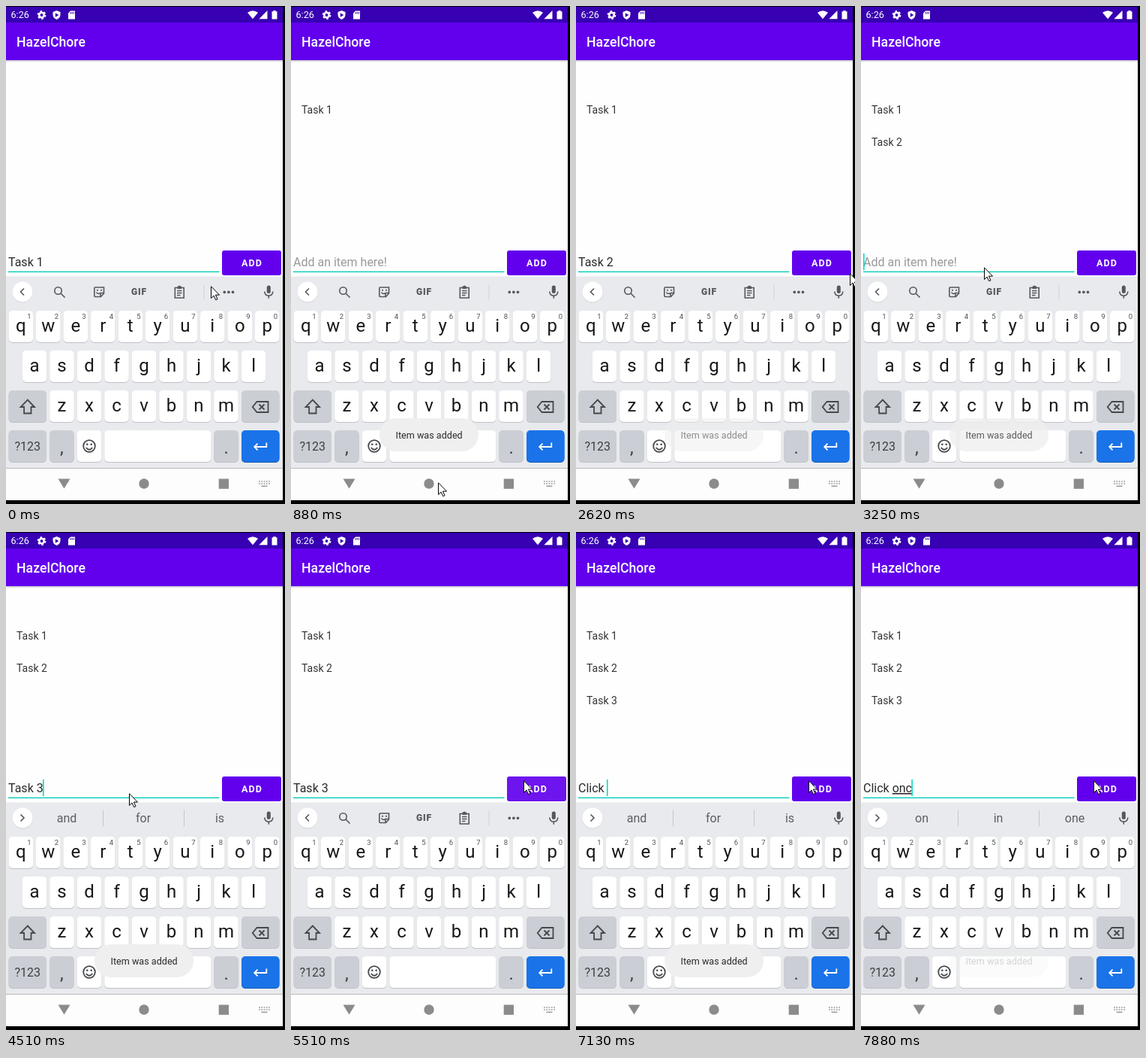
An HTML page that plays this animation: 372 by 662 pixels, repeating every 8 s.

```html
<!DOCTYPE html>
<html lang="en">
<head>
<meta charset="utf-8">
<title>Task list</title>
<style>
  html, body { margin: 0; width: 100%; height: 100%; overflow: hidden; background: #000; }
  svg { display: block; width: 372px; height: 662px; font-family: Roboto, sans-serif; }
  text { white-space: pre; }
  .mid { text-anchor: middle; }
  .line { fill: none; stroke: #54575b; stroke-width: 1.6; }
  .ink { fill: #54575b; }
</style>
</head>
<body>
<svg viewBox="0 0 372 662">
  <defs>
    <linearGradient id="shade" x2="0" y2="1"><stop stop-color="#c8c8cc"/><stop offset="1" stop-color="#fefefe"/></linearGradient>
  </defs>
  <rect width="372" height="662"/>
  <rect y="72" width="369" height="288" fill="#fefefe"/>
  <rect y="72" width="369" height="3" fill="url(#shade)"/>
  <rect y="1" width="369" height="21" fill="#3700b3"/>
  <rect y="22" width="369" height="50" fill="#6200ee"/>

  <!-- status bar -->
  <g fill="#fff">
    <text x="6.5" y="16.3" font-size="12.6">6:26</text>
    <circle cx="47.5" cy="12" r="3.2" fill="none" stroke="#fff" stroke-width="2.6"/>
    <circle cx="47.5" cy="12" r="5" fill="none" stroke="#fff" stroke-width="1.8" stroke-dasharray="2.6 2.636"/>
    <path d="M67.5 6L72.5 8V11.5Q72.2 16 67.5 18Q62.8 16 62.5 11.5V8Z"/>
    <path d="M65.8 9.2L70.3 12L65.8 14.8Z" fill="#3700b3"/>
    <path d="M86 6.5H92V17.5H83V9.5Z"/>
    <path d="M86.3 8V10.5M88.3 8V10.5M90.3 8V10.5" stroke="#3700b3"/>
    <path d="M322 8.8Q329 3.6 336 8.8L329 17.3Z"/>
    <path d="M348.5 6V17.3H337.3Z"/>
    <path d="M356.4 6H359.6V7.2H361.5V17.5H354.5V7.2H356.4Z"/>
  </g>
  <text x="14" y="54" font-size="17.7" font-weight="500" fill="#fff">HazelChore</text>

  <g id="list" font-size="14" fill="#333"></g>

  <!-- entry row -->
  <rect x="3" y="352.6" width="281.5" height="1.5" fill="#10cdbc"/>
  <text id="hint" x="3" y="346" font-size="16" fill="#999">Add an item here!</text>
  <text id="field" x="3" y="346" font-size="16" fill="#2a2a2a" xml:space="preserve"><tspan></tspan><tspan text-decoration="underline"></tspan></text>
  <rect id="caret" y="329" width="1.6" height="22" fill="#03dac5"/>
  <rect x="288" y="325" width="79" height="33" rx="3" fill="#6200ee"/>
  <rect id="ripple" x="288" y="325" width="79" height="33" rx="3" fill="#fff"/>
  <text x="314" y="346.4" font-size="12.5" font-weight="700" letter-spacing="1.1" fill="#fff">ADD</text>

  <!-- keyboard -->
  <rect y="359.5" width="369" height="255" fill="#e8eaed"/>
  <circle cx="22" cy="380.8" r="13.7" fill="#d2d4d8"/>
  <circle cx="22" cy="380" r="13.5" fill="#fff"/>
  <path id="chevron" class="line" d="M24 375.5L19.5 380L24 384.5"/>
  <g id="tools">
    <circle class="line" cx="69.5" cy="378.5" r="4.7"/>
    <path class="line" d="M73 382L78.5 387.5"/>
    <path class="line" d="M119 374H130.5V382L126.5 386.5H119Q117.8 386.5 117.8 385V375.3Q117.8 374 119 374ZM130.5 381.5H126V386.5M120.5 380.5Q122 383.5 125 382"/>
    <circle class="ink" cx="122" cy="377.8" r="1.1"/>
    <circle class="ink" cx="127" cy="377.8" r="1.1"/>
    <text class="ink mid" x="177.5" y="384.3" font-size="12" font-weight="900" letter-spacing=".9">GIF</text>
    <path class="line" d="M225.3 374.5H237.2V388H225.3ZM228 378.5H234.5M228 381.5H234.5M228 384.5H232.5"/>
    <path class="ink" d="M228.5 372.5H230Q231.2 370.5 232.5 372.5H234V376H228.5Z"/>
    <path d="M264 371V390" stroke="#cfd1d5"/>
    <path d="M291.3 380.3H303" stroke="#54575b" stroke-width="3.8" stroke-linecap="round" stroke-dasharray="0 5.6"/>
  </g>
  <g id="words" class="mid" font-size="16" fill="#5b5e63">
    <path d="M129.5 369.5V391M237.5 369.5V391" stroke="#c3c5c9"/>
    <text x="81" y="386"></text><text x="183" y="386"></text><text x="285" y="386"></text>
  </g>
  <rect class="ink" x="347.8" y="371.5" width="5" height="10.5" rx="2.5"/>
  <path class="line" d="M344.8 379.5Q345 385 350.3 385Q355.6 385 355.8 379.5M350.3 385V388.8"/>
  <g id="keys"></g>
  <g fill="none" stroke="#45484c" stroke-width="1.8">
    <path d="M28.8 523.5L38 533H33.5V541.5H24.1V533H19.6Z"/>
    <path d="M334.5 526H349.5V540H334.5L328.8 533ZM337.5 529.5L344.5 536.5M344.5 529.5L337.5 536.5"/>
    <circle cx="111" cy="585" r="7.8"/>
    <path d="M106.7 587Q111 592.5 115.3 587"/>
    <path d="M347.3 580.5V586H331.5M335.5 581.7L331.2 586L335.5 590.3" stroke="#fff"/>
  </g>
  <circle cx="108.3" cy="582.8" r="1.3" fill="#45484c"/>
  <circle cx="113.7" cy="582.8" r="1.3" fill="#45484c"/>

  <!-- navigation bar -->
  <rect y="614.5" width="369" height="42.5" fill="#fdfdfd"/>
  <g fill="#8b8b8b">
    <path d="M69.5 628.5H85.5L77.5 641.5Z"/>
    <circle cx="184" cy="635" r="6.7"/>
    <rect x="283.7" y="628.5" width="13.3" height="13.3"/>
  </g>
  <path d="M337 632H352M337 635H352" stroke="#999" stroke-width="1.7" stroke-dasharray="1.8 1.5"/>
  <path d="M340.5 638.3H348.5" stroke="#999" stroke-width="1.5"/>

  <g id="toast">
    <rect x="118" y="548" width="132" height="44" rx="22" fill="#efefef"/>
    <text x="139.5" y="575" font-size="12.6" fill="#2a2a2a">Item was added</text>
  </g>
  <path id="mouse" d="M.5 .8V16.5L4.1 13.1L6.7 18.7L9 17.7L6.4 12.1H11.5Z" fill="#fff" stroke="#000"/>
</svg>

<script>
const $ = id => document.getElementById(id);
const clamp = v => Math.max(0, Math.min(1, v));
const show = (el, on) => { el.style.display = on ? '' : 'none'; };

// ---- static parts ----
const PITCH = 36.5, KEY = 32.5, WIDE = 50.5;
const WHITE = '#fff', GREY = '#cbced4', BLUE = '#1a73e8';

function key(x, y, w, fill, label = '', size = 24, base = 28) {
  const ink = fill === WHITE ? '#161718' : '#3c4043';
  const box = (dy, color) =>
    `<rect x="${x}" y="${y + dy}" width="${w}" height="42" rx="5" fill="${color}"/>`;
  return box(1, fill === BLUE ? '#145cbb' : '#bfc1c6') + box(0, fill) +
    `<text class="mid" x="${x + w / 2}" y="${y + base}" font-size="${size}" fill="${ink}">${label}</text>`;
}
const row = (letters, x, y) =>
  [...letters].map((c, i) => key(x + i * PITCH, y, KEY, WHITE, c)).join('');
const digits = [...'1234567890'].map((d, i) =>
  `<text class="mid" x="${31 + i * PITCH}" y="416" font-size="9.5" fill="#4c4f53">${d}</text>`).join('');

const [Y1, Y2, Y3, Y4] = [0, 1, 2, 3].map(i => 405 + 53 * i);
$('keys').innerHTML =
  row('qwertyuiop', 3.5, Y1) + digits + row('asdfghjkl', 21.8, Y2) +
  key(3.5, Y3, WIDE, GREY) + row('zxcvbnm', 58.2, Y3) + key(314, Y3, WIDE, GREY) +
  key(3.5, Y4, WIDE, GREY, '?123', 16, 27) + key(58.2, Y4, KEY, GREY, ',', 24, 31) +
  key(94.8, Y4, KEY, WHITE) + key(131.3, Y4, 142, WHITE) +
  key(277.3, Y4, KEY, GREY, '.', 24, 31) + key(314, Y4, WIDE, BLUE);

$('list').innerHTML = [1, 2, 3].map(n =>
  `<text x="14" y="${99.5 + 43 * n}">Task ${n}</text>`).join('');

// ---- timing, counted in screen updates ----
const STEP = 125, STEPS = 64;
const RATE = 1.25;              // letters per step
const IDLE = 6;                 // steps until the tools return after a number
const adds = [4, 24, 45];       // taps on the button
const bursts = [
  { at: -9, text: 'Task 1' }, { at: 11, text: 'Task 2' }, { at: 32, text: 'Task 3' },
  { at: 53, text: 'Click ' }, { at: 61, text: 'onc', before: 'Click ' }
];
const caretOn = [[11, 18], [25, 28], [32, 40], [52, 64]];
const guesses = { T: 'Take Task Talk', C: 'Click Clock Close', o: 'on in one' };
const path = [                  // step, x, y
  [0, 273, 372], [2, 316, 336], [4, 316, 336], [7, 196, 633], [13, 196, 633],
  [17, 296, 345], [19, 330, 196], [21, 365, 355], [23, 330, 338], [24, 330, 338],
  [26, 164, 347], [39, 164, 347], [41, 349, 338], [44, 310, 330], [STEPS, 310, 330]
];

function mouseAt(k) {
  const i = path.findIndex(p => p[0] > k);
  const [a, b] = [path[i - 1], path[i]];
  const u = (k - a[0]) / (b[0] - a[0]);
  const ease = u * u * (3 - 2 * u);
  return [1, 2].map(c => a[c] + (b[c] - a[c]) * ease);
}

function typing(k, added) {
  const burst = bursts.filter(b => b.at <= k).pop();
  if (added > burst.at) return { text: '', word: '', guess: '' };
  const text = (burst.before || '') + burst.text.slice(0, Math.floor((k - burst.at) * RATE) + 1);
  const word = text.match(/[a-z]*$/i)[0];
  const idle = /\d$/.test(text) && k >= burst.at + IDLE;
  const guess = text.length > 1 && !idle ? guesses[word[0]] || 'and for is' : '';
  return { text, word, guess };
}

function draw(k) {
  const done = adds.filter(a => a <= k);
  const added = done.length ? done[done.length - 1] : -99;
  const { text, word, guess } = typing(k, added);

  const [plain, composed] = $('field').children;
  plain.textContent = text.slice(0, text.length - word.length);
  composed.textContent = word;
  show($('hint'), !text);
  show($('caret'), caretOn.some(([a, b]) => k >= a && k < b));
  $('caret').setAttribute('x', text ? 2.3 + $('field').getComputedTextLength() : 3);

  show($('tools'), !guess);
  show($('words'), guess);
  const list = guess.split(' ');
  $('words').querySelectorAll('text').forEach((el, i) => { el.textContent = list[i] || ''; });
  $('chevron').setAttribute('transform', guess ? 'matrix(-1 0 0 1 43.5 0)' : '');

  [...$('list').children].forEach((el, i) => show(el, i < done.length));
  const age = k - added;
  $('toast').setAttribute('opacity', Math.min(clamp(age / 2.6), clamp((18.6 - age) / 3)));
  const press = Math.max(...adds.map(a => clamp(1 - Math.abs(k - a) / 2)));
  $('ripple').setAttribute('opacity', 0.16 * press);
  $('mouse').setAttribute('transform', `translate(${mouseAt(k)})`);
}

const begin = performance.now();
function tick() {
  const t = performance.now() - begin;
  draw(Math.floor((t + 10) / STEP) % STEPS);
  requestAnimationFrame(tick);
}
tick();
</script>
</body>
</html>
```
